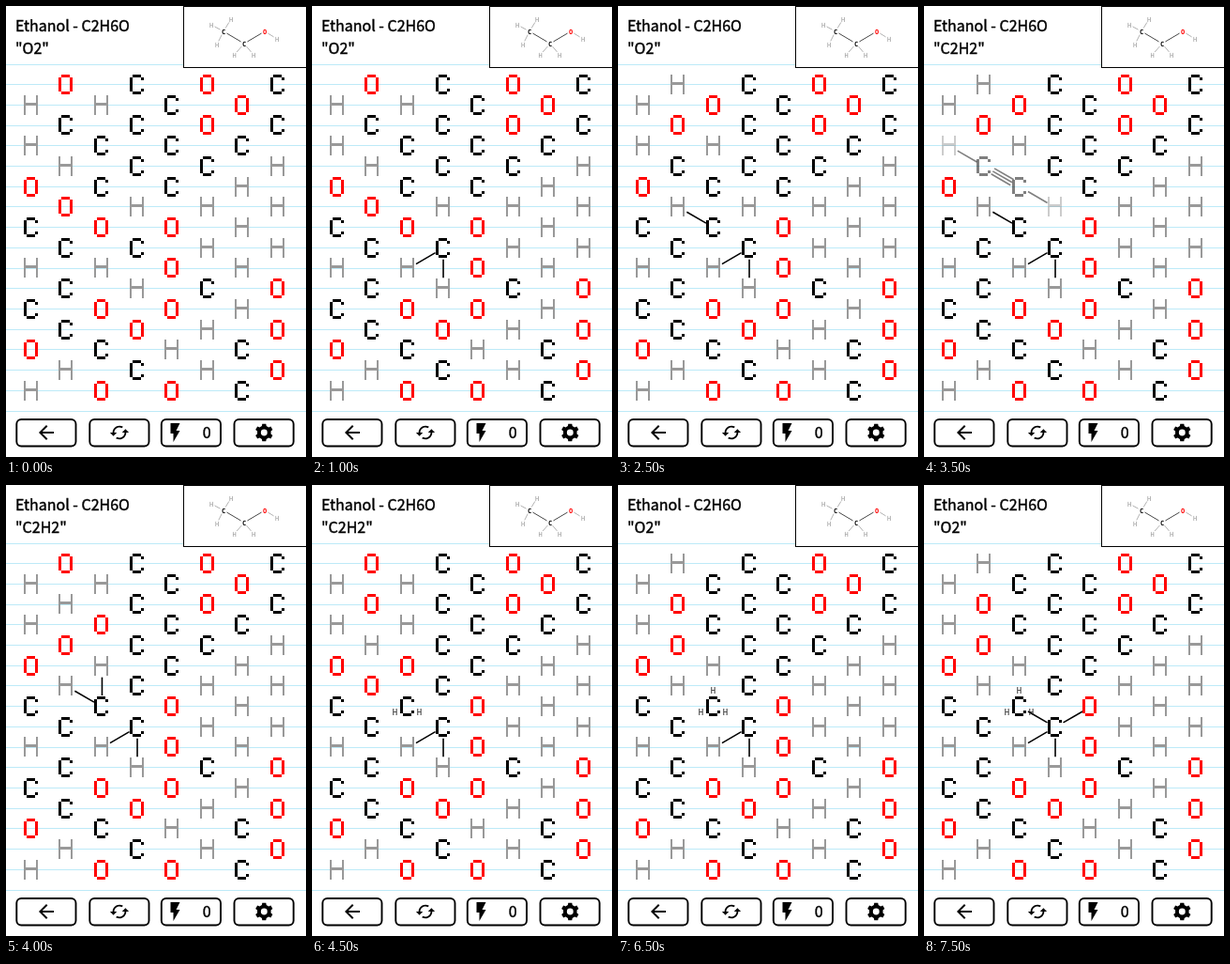
Write an HTML page with a canvas that moves like this. It is 320 px wide and 480 px high and loops after 8 s.

```html
<!DOCTYPE html>
<html lang="en">
<head>
<meta charset="utf-8">
<title>Molecule puzzle</title>
<style>
html, body { margin: 0; width: 100%; height: 100%; overflow: hidden; background: #fff; }
canvas { display: block; }
</style>
</head>
<body>
<canvas id="stage" width="320" height="480"></canvas>
<script>
const ctx = document.getElementById('stage').getContext('2d');
const STEP = 500, LOOP = 8000;
const FONT = '500 16px "Noto Sans CJK JP", "Noto Sans CJK SC", "Noto Sans", sans-serif';

const GLYPHS = {
  C: ['.###.', '#...#', '#....', '#....', '#....', '#...#', '.###.'],
  H: ['#.....#', '#.....#', '#.....#', '#.....#', '#######', '#.....#', '#.....#', '#.....#', '#.....#', '#.....#'],
  O: ['.###.', '#...#', '#...#', '#...#', '#...#', '#...#', '.###.']
};
const COLORS = { C: '#000', H: '#999', O: '#f00' };
const COLUMNS = ['HHOCHCOH', 'OCHOCCCH', 'HCCOHOCO', 'CCCHCHOC', 'CCCOOOHO', 'OOCHHCHH', 'OCHHHHCC', 'CCHHHOOO'];

// Board cells are "column,row" strings; odd columns sit half a row higher.
const PITCH = 21.71;
const cellX = c => 27.3 + 37.58 * c;
const cellY = (c, r) => 84.1 + PITCH * (2 * r + (c % 2 ? 0 : 1));
const parse = cell => cell.split(',').map(Number);

const board = { cols: COLUMNS, bonds: [], faded: [], labels: [], title: 'O2' };

const bond = (a, b, order = 1) => s => s.bonds.push({ a, b, order });
const fade = (...cells) => s => s.faded.push(...cells);
const title = text => s => { s.title = text; };
const label = (x, y) => s => s.labels.push([x, y]);
const drop = (cell, fresh) => s => {
  const [c, r] = parse(cell), old = s.cols[c];
  s.cols[c] = fresh + old.slice(0, r) + old.slice(r + 1);
  s.bonds = s.bonds.filter(b => b.a !== cell && b.b !== cell);
  s.faded = s.faded.filter(f => f !== cell);
};

const STEPS = [
  [],
  [bond('3,4', '2,4')],
  [bond('3,4', '3,5')],
  [bond('1,3', '2,3', 2)],
  [fade('1,3', '2,3')],
  [drop('1,3', 'H'), drop('2,3', 'O'), bond('1,3', '2,3')],
  [bond('0,1', '1,2'), bond('1,2', '2,2', 3), bond('2,2', '3,3')],
  [fade('0,1', '1,2', '2,2', '3,3'), title('C2H2')],
  [drop('0,1', 'H'), drop('1,2', 'O'), drop('2,2', 'H'), drop('3,3', 'C'), bond('2,2', '2,3')],
  [drop('1,3', 'O'), drop('2,2', 'H'), label(88.5, 242), label(114.5, 242)],
  [bond('1,3', '2,2', 2), fade('1,3', '2,2'), title('O2')],
  [drop('1,3', 'H'), drop('2,2', 'C'), bond('2,2', '2,3')],
  [fade('2,2')],
  [drop('2,2', 'C'), label(101.5, 219)],
  [bond('2,3', '3,4')],
  [bond('3,4', '4,3')]
];

const copy = s => JSON.parse(JSON.stringify(s));
const states = [];
STEPS.reduce((prev, actions) => {
  const next = copy(prev);
  actions.forEach(act => act(next));
  states.push(next);
  return next;
}, board);

function line(x1, y1, x2, y2, color, width) {
  ctx.strokeStyle = color;
  ctx.lineWidth = width;
  ctx.beginPath();
  ctx.moveTo(x1, y1);
  ctx.lineTo(x2, y2);
  ctx.stroke();
}

function text(str, x, y, font, color = '#000', align = 'left') {
  ctx.font = font;
  ctx.fillStyle = color;
  ctx.textAlign = align;
  ctx.fillText(str, x, y);
}

// A hairline outline lifts the regular face to a medium weight.
function mediumText(str, x, y, align) {
  text(str, x, y, FONT, '#000', align);
  ctx.strokeStyle = '#000';
  ctx.lineWidth = 0.4;
  ctx.strokeText(str, x, y);
}

function drawAtom(kind, c, r) {
  const glyph = GLYPHS[kind];
  const left = Math.floor(cellX(c) - 7.9), top = Math.round(cellY(c, r) - 11.1);
  const px = 15 / glyph[0].length, py = 21 / glyph.length;
  ctx.fillStyle = COLORS[kind];
  glyph.forEach((row, j) => [...row].forEach((dot, i) => {
    if (dot !== '#') return;
    const x = Math.round(i * px), y = Math.round(j * py);
    ctx.fillRect(left + x, top + y, Math.round((i + 1) * px) - x, Math.round((j + 1) * py) - y);
  }));
}

function drawBond({ a, b, order }) {
  const [c1, r1] = parse(a), [c2, r2] = parse(b);
  const x1 = cellX(c1), y1 = cellY(c1, r1), x2 = cellX(c2), y2 = cellY(c2, r2);
  const len = Math.hypot(x2 - x1, y2 - y1), ux = (x2 - x1) / len, uy = (y2 - y1) / len;
  const inset = c1 === c2 ? 12 : 9.8;
  for (let i = 0; i < order; i++) {
    const off = (i - (order - 1) / 2) * 3.4, ox = -uy * off, oy = ux * off;
    line(x1 + ux * inset + ox, y1 + uy * inset + oy, x2 - ux * inset + ox, y2 - uy * inset + oy, '#000', 1.6);
  }
}

function drawPaper() {
  ctx.fillStyle = '#fff';
  ctx.fillRect(0, 0, 320, 480);
  ctx.fillStyle = '#bdeaf8';
  for (let i = 0; i < 18; i++) ctx.fillRect(0, Math.floor(62 + PITCH * i), 320, 1);
}

function drawMolecule() {
  ctx.fillStyle = '#fff';
  ctx.fillRect(189, 0, 131, 66);
  ctx.strokeStyle = '#000';
  ctx.lineWidth = 1;
  ctx.strokeRect(189.5, 0.5, 135, 65);
  const atoms = [['C', 232, 27], ['C', 254, 40], ['O', 276, 27], ['H', 219, 20], ['H', 240, 14],
    ['H', 225, 41], ['H', 243.5, 52], ['H', 264, 52], ['H', 289, 35]];
  for (const [i, j] of ['01', '12', '03', '04', '05', '16', '17', '28']) {
    const [, x1, y1] = atoms[i], [kind, x2, y2] = atoms[j];
    const d = Math.hypot(x2 - x1, y2 - y1), k = 4 / d;
    line(x1 + (x2 - x1) * k, y1 + (y2 - y1) * k, x2 - (x2 - x1) * k, y2 - (y2 - y1) * k,
      kind === 'H' ? '#aaa' : '#333', 0.9);
  }
  for (const [kind, x, y] of atoms)
    text(kind, x, y + 2.6, (kind === 'H' ? '' : 'bold ') + '7px "DejaVu Sans Mono", monospace', COLORS[kind], 'center');
}

const ICONS = {
  back: new Path2D('M20 11H7.83l5.59-5.59L12 4l-8 8 8 8 1.41-1.41L7.83 13H20z'),
  reload: new Path2D('M19 8l-4 4h3c0 3.31-2.69 6-6 6-1.01 0-1.97-.25-2.8-.7l-1.46 1.46C8.97 19.54 10.43 20 12 20c4.42 0 8-3.58 8-8h3z' +
    'M6 12c0-3.31 2.69-6 6-6 1.01 0 1.97.25 2.8.7l1.46-1.46C15.03 4.46 13.57 4 12 4c-4.42 0-8 3.58-8 8H1l4 4 4-4z'),
  bolt: new Path2D('M7 2v11h3v9l7-12h-4l4-8z'),
  gear: gearPath()
};

function gearPath() {
  const p = new Path2D();
  for (let i = 0; i < 24; i++) {
    const a = (Math.floor(i / 4) + 0.5 + [-0.32, -0.2, 0.2, 0.32][i % 4]) * Math.PI / 3;
    const r = i % 4 === 1 || i % 4 === 2 ? 10 : 7.7;
    p.lineTo(12 + r * Math.cos(a), 12 + r * Math.sin(a));
  }
  p.closePath();
  p.moveTo(15.6, 12);
  p.arc(12, 12, 3.6, 0, Math.PI * 2);
  return p;
}

function icon(name, x, y, size) {
  ctx.save();
  ctx.translate(x - size / 2, y - size / 2);
  ctx.scale(size / 24, size / 24);
  ctx.fillStyle = '#000';
  ctx.fill(ICONS[name], 'evenodd');
  ctx.restore();
}

function drawButtons() {
  for (const x of [11.3, 89.3, 165.8, 243.5]) {
    ctx.beginPath();
    ctx.roundRect(x, 440, 63.2, 28.5, 5);
    ctx.fillStyle = '#fff';
    ctx.fill();
    ctx.strokeStyle = '#000';
    ctx.lineWidth = 1.9;
    ctx.stroke();
  }
  icon('back', 43, 454, 24);
  icon('reload', 121, 454, 22);
  icon('bolt', 180.5, 454, 24);
  icon('gear', 275.3, 454, 23);
  mediumText('0', 214.3, 459.5, 'center');
}

function draw(t) {
  const s = states[Math.floor((t % LOOP) / STEP)];
  const alpha = on => { ctx.globalAlpha = on ? 0.5 : 1; };
  drawPaper();
  mediumText('Ethanol - C2H6O', 10, 26.5);
  mediumText('"' + s.title + '"', 10, 50.5);
  drawMolecule();
  s.bonds.forEach(b => {
    alpha(s.faded.includes(b.a) || s.faded.includes(b.b));
    drawBond(b);
  });
  s.cols.forEach((col, c) => [...col].forEach((kind, r) => {
    alpha(s.faded.includes(c + ',' + r));
    drawAtom(kind, c, r);
  }));
  alpha(false);
  s.labels.forEach(([x, y]) => text('H', x, y + 3, '9px "DejaVu Sans Mono", monospace', '#222', 'center'));
  drawButtons();
}

const start = performance.now();
function tick() {
  draw(performance.now() - start);
  requestAnimationFrame(tick);
}
tick();
</script>
</body>
</html>
```
